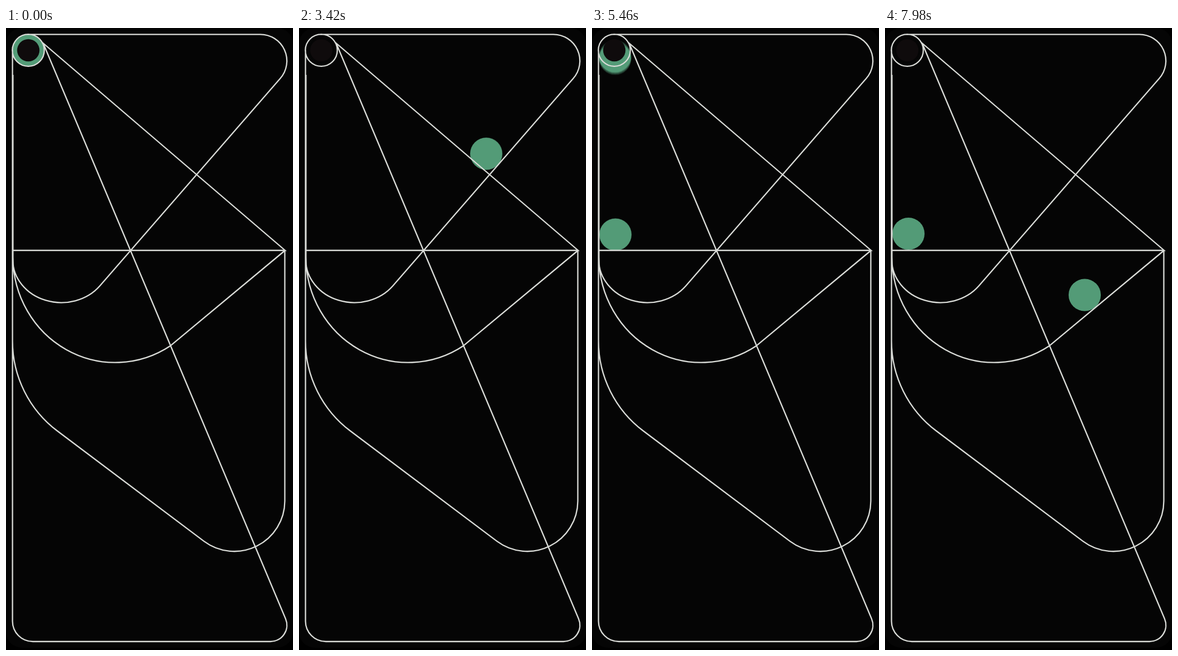
An HTML page with a canvas that plays this animation: 508x1102 px, repeating every 8000 ms.

```html
<!DOCTYPE html>
<html lang="en">
<head>
<meta charset="utf-8">
<title>Rolling balls</title>
<style>
html, body { margin: 0; width: 100%; height: 100%; overflow: hidden; background: #000; }
canvas { display: block; }
</style>
</head>
<body>
<canvas id="stage" width="508" height="1102"></canvas>
<script>
const ctx = document.getElementById('stage').getContext('2d');
const LOOP = 8000, RADIUS = 28.5, SHUTTER = 14, SAMPLES = 6;

const rails = new Path2D(`
  M67.8 39.5 A28.3 28.3 0 1 1 11.2 39.5 A28.3 28.3 0 1 1 67.8 39.5
  M39.5 11.3 H450 A47 47 0 0 1 485.3 89.5 L166 457 A86 76 0 0 1 12 410.5
  M11.5 39.5 V1051 A36 36 0 0 0 47.5 1087 H468 A29 29 0 0 0 494.8 1046.5 L65.8 27
  L494 394 H12
  M493.5 394 V838 A89.4 89.4 0 0 1 350.5 909.4 L91 714 A199.5 199.5 0 0 1 11.5 554.6
  M12.3 83 V406 A181 187 0 0 0 291.5 562.7 L494 394`);

// Eases in and out; a higher power makes the ball slower to get going.
const roll = (power = 1) => u => (1 - Math.cos(Math.PI * u ** power)) / 2;
const linear = u => u;

function move(start, end, ease, d) {
  const path = document.createElementNS('http://www.w3.org/2000/svg', 'path');
  path.setAttribute('d', d);
  return { start, end, ease, path, length: path.getTotalLength() };
}

const firstBall = [
  move(840, 2160, roll(1.6), 'M39.5 39.5 H105 Q125.5 39.5 141 52.5 L334.8 218.8'),
  move(2160, 2400, roll(), 'M334.8 218.8 L345 207'),
  move(2400, 2640, roll(), 'M345 207 L334.8 218.8'),
  move(3190, 4800, roll(1.4), 'M334.8 218.8 L171 411 L144 438 A57 47.5 0 0 1 41 410 L41.5 348'),
  move(4800, 5040, roll(), 'M41.5 348 V364.5'),
  move(5400, 6770, roll(1.1), 'M41.5 364.5 L41 406 A152 160 0 0 0 284 534 L415.5 422.5'),
  move(6780, 7980, roll(), 'M415.5 422.5 L353.5 473')
];
const secondBall = [
  move(5427, 6290, linear, 'M39.5 39.5 L41 52 L41.5 364.5')
];

function position(moves, t) {
  const { start, end, ease, path, length } = moves.findLast(m => m.start <= t) || moves[0];
  const u = Math.min(1, Math.max(0, (t - start) / (end - start)));
  return path.getPointAtLength(length * ease(u));
}

function disc(x, y, r, color) {
  ctx.fillStyle = color;
  ctx.beginPath();
  ctx.arc(x, y, r, 0, 2 * Math.PI);
  ctx.fill();
}

// Samples within the shutter add up to the full green, giving motion blur.
function drawBall(moves, t, opacity = 1) {
  ctx.save();
  ctx.globalCompositeOperation = 'lighter';
  ctx.globalAlpha = opacity;
  for (let i = 0; i < SAMPLES; i++) {
    const p = position(moves, t + SHUTTER * (i / (SAMPLES - 1) - 0.5));
    disc(p.x, p.y, RADIUS, 'rgb(13, 25, 19)');
  }
  ctx.restore();
}

function draw() {
  const t = performance.now() % LOOP;
  ctx.fillStyle = '#000';
  ctx.fillRect(0, 0, 508, 1102);
  ctx.fillStyle = '#050505';
  ctx.beginPath();
  ctx.roundRect(0, 0, 508, 1098, 28);
  ctx.fill();

  drawBall(firstBall, t);
  const appear = Math.min(1, (t - 4300) / 500);
  if (appear > 0) drawBall(secondBall, t, appear);

  disc(39.5, 39.5, 19.8, '#0f0b0c');
  ctx.strokeStyle = '#dadcd8';
  ctx.lineWidth = 2.3;
  ctx.stroke(rails);
  requestAnimationFrame(draw);
}
draw();
</script>
</body>
</html>
```
